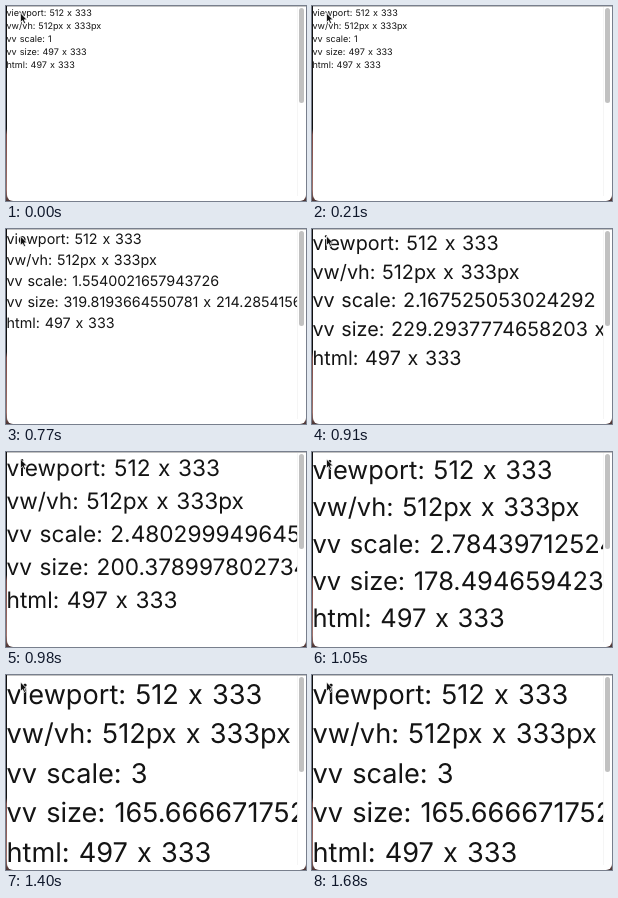
Write an HTML page that moves like this. It is 300 by 195 pixels and loops after 1890 ms.

```html
<!DOCTYPE html>
<html lang="en">
<head>
<meta charset="utf-8">
<title>Pinch zoom</title>
<style>
  html, body { margin: 0; height: 100%; overflow: hidden; background: #fff; }
  svg { display: block; }
  text {
    font: 9.05px Inter, "Noto Sans CJK SC", sans-serif;
    font-feature-settings: "calt" 0;
    font-optical-sizing: none;
    word-spacing: .055em;
    text-rendering: geometricPrecision;
    fill: #141414;
  }
</style>
</head>
<body>
<svg width="300" height="195" viewBox="0 0 300 195">
  <defs>
    <linearGradient id="desktop" x1="0" y1="0" x2="0" y2="1">
      <stop offset=".63" stop-color="#111"/>
      <stop offset=".66" stop-color="#7d4a45"/>
      <stop offset=".94" stop-color="#a0726b"/>
      <stop offset="1" stop-color="#4a3434"/>
    </linearGradient>
  </defs>
  <rect width="300" height="195" fill="url(#desktop)"/>
  <rect x="1" y="-10" width="299" height="205" rx="6" fill="#fff"/>
  <path d="M1 .4H300" stroke="#aaa" stroke-width=".8"/>
  <svg width="291.2" height="195"><g id="page"></g></svg>
  <path d="M291.5 1V190" stroke="#eee" stroke-width=".6"/>
  <rect x="293" y="2" width="5" height="95" rx="2.5" fill="#c1c1c1"/>
  <path d="M14.5 7v9.3l2.1-1.9 1.4 3.2 1.6-.7-1.4-3.1h2.9z" fill="#111" stroke="#fff" stroke-width=".7"/>
</svg>
<script>
const LOOP = 1890, STEP = 70, ZOOM_START = 630, LINE = 13.18;
const page = document.getElementById('page');
const svgNS = 'http://www.w3.org/2000/svg';

// Reported scale and the slightly newer drawn scale, one pair per step
const zoom = [
  [1.093853235244751, 1.108], [1.3127, 1.335], [1.5540021657943726, 1.585],
  [1.8561, 1.878], [2.167525053024292, 2.184], [2.4803, 2.505],
  [2.78439712524, 2.815], [3, 3]
];

const lines = Array.from({ length: 5 }, (_, i) => {
  const line = document.createElementNS(svgNS, 'text');
  line.setAttribute('y', 9.5 + i * LINE);
  return page.appendChild(line);
});

function draw(now) {
  const step = Math.floor((now % LOOP - ZOOM_START) / STEP);
  const [reported, drawn] = step < 0 ? [1, 1] : zoom[Math.min(step, zoom.length - 1)];
  const scale = Math.fround(reported);
  const visible = size => Math.fround(size / scale);
  [
    'viewport: 512 x 333',
    'vw/vh: 512px x 333px',
    `vv scale: ${scale}`,
    `vv size: ${visible(497)} x ${visible(333)}`,
    'html: 497 x 333'
  ].forEach((content, i) => { lines[i].textContent = content; });
  page.setAttribute('transform', `translate(.5 0) scale(${drawn})`);
}

const start = performance.now();
function tick() {
  draw(performance.now() - start);
  requestAnimationFrame(tick);
}
tick();
</script>
</body>
</html>
```
